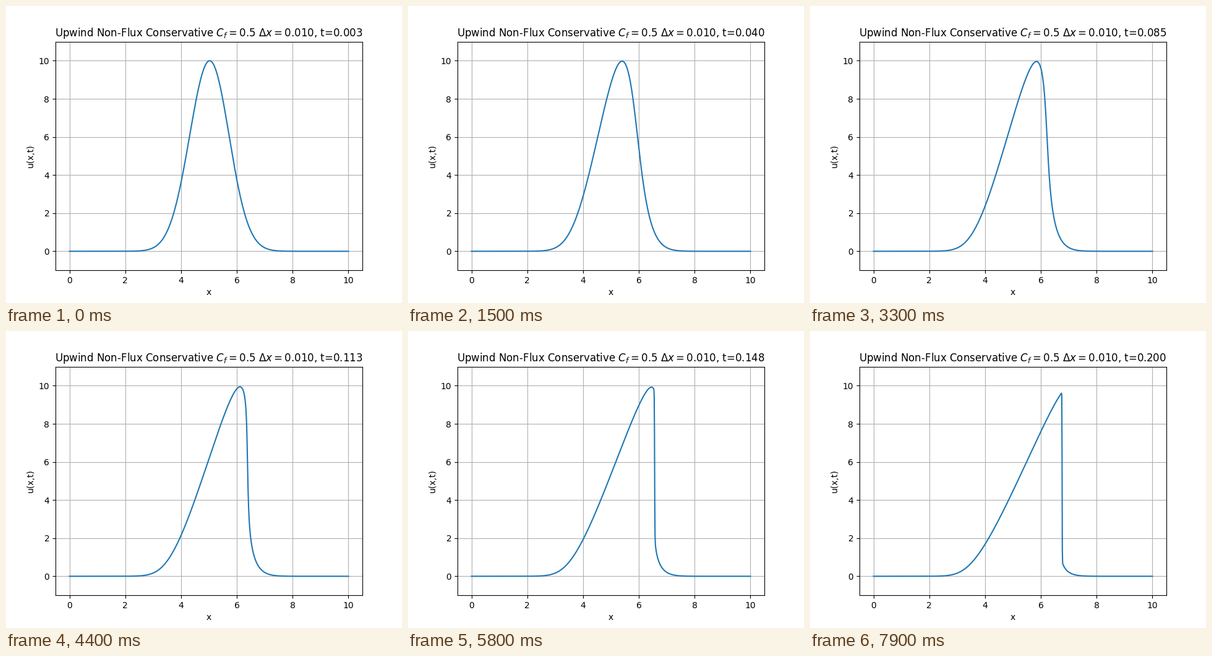
Write a matplotlib script that moves like this. It is 640x480 px and loops after 8 s.

```python
import numpy as np
import matplotlib.pyplot as plt
from matplotlib.animation import FuncAnimation

FRAMES = 80
STEPS = 5  # solver steps per frame
CF = 0.5
DX = 0.01
U_MAX = 10
DT = CF * DX / U_MAX


def solve(x):
    """Burgers' equation, upwind in non-conservative form."""
    u = U_MAX * np.exp(-(x - 5) ** 2)
    states = []
    for _ in range(FRAMES):
        for _ in range(STEPS):
            u[1:] -= DT / DX * u[1:] * (u[1:] - u[:-1])
        states.append(u.copy())
    return states


def title_text(i):
    t = (i + 1) * STEPS * DT + 1e-9  # round halves up
    return (f"Upwind Non-Flux Conservative $C_f={CF}$ "
            rf"$\Delta x={DX:.3f}$, t={t:.3f}")


x = np.linspace(0, 10, 1001)
states = solve(x)

fig, ax = plt.subplots(figsize=(6.4, 4.8), dpi=100)
line, = ax.plot(x, states[0])
ax.set_xlim(-0.5, 10.5)
ax.set_ylim(-1, 11)
ax.set_xlabel("x")
ax.set_ylabel("u(x,t)")
ax.grid(True)
title = ax.set_title(title_text(0))


def update(i):
    line.set_ydata(states[i])
    title.set_text(title_text(i))
    return line, title


anim = FuncAnimation(fig, update, frames=FRAMES, interval=100,
                     repeat=True, repeat_delay=0, blit=False)
plt.show()
```
